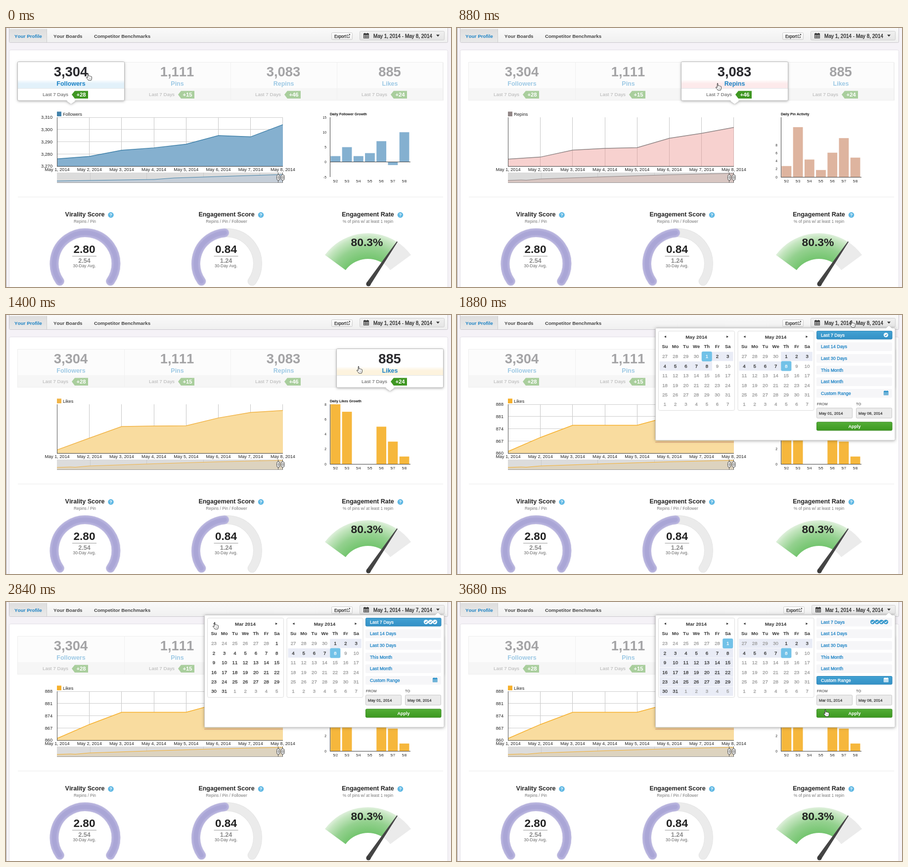
An HTML page with a canvas that plays this animation: 900x525 px, repeating every 3720 ms.

```html
<!DOCTYPE html>
<html lang="en">
<head>
<meta charset="utf-8">
<title>Profile dashboard</title>
<style>
html, body { margin: 0; width: 100%; height: 100%; overflow: hidden; background: #fff; }
canvas { display: block; width: 900px; height: 525px; }
</style>
</head>
<body>
<canvas id="stage" width="900" height="525"></canvas>
<script>
const g = document.getElementById('stage').getContext('2d');
const LOOP = 3720, OPEN = 1840, BLUE = '#1b82c5', GREEN = '#3f9723';
g.fontKerning = 'none';

const series = [
  { name: 'Followers', total: '3,304', gain: 28, first: 3276, daily: [2, 5, 2, 3, 7, -1, 10],
    axis: [3270, 3310, 10], barAxis: [-5, 15, 5], title: 'Daily Follower Growth', start: -999,
    line: [66, 130, 170], fill: '#85b0cf', bar: '#84b0d0', tint: '#e2f1fa', mini: '#c5ced8' },
  { name: 'Pins', total: '1,111', gain: 15, first: 1096, daily: [1, 2, 0, 0, 7, 1, 4],
    axis: [1095, 1115, 5], barAxis: [0, 8, 2], title: 'Daily Pin Activity', start: 230,
    line: [51, 51, 56], fill: 'rgba(110,110,110,.46)', bar: '#a8a7a7', tint: '#f1f1f3', mini: '#c9bfc0' },
  { name: 'Repins', total: '3,083', gain: 46, first: 3037, daily: [3, 14, 5, 2, 6, 11, 5],
    axis: [3020, 3100, 20], barAxis: [0, 16, 4], title: 'Daily Pin Activity', start: 720,
    line: [216, 196, 192], fill: 'rgba(235,140,135,.4)', bar: '#deb49f', tint: '#fdeaeb', mini: '#d8c6c2' },
  { name: 'Likes', total: '885', gain: 24, first: 861, daily: [8, 7, 0, 0, 5, 3, 1],
    axis: [860, 888, 7], barAxis: [0, 8, 2], title: 'Daily Likes Growth', start: 1170,
    line: [246, 176, 45], fill: '#f9dc9f', bar: '#f6b73c', tint: '#fdf3de', mini: '#ddd3bf' }
];
for (const s of series) {
  let v = s.first;
  const [lo, hi] = s.axis;
  s.ys = [v, ...s.daily.map(d => v += d)].map(n => 280 - (n - lo) / (hi - lo) * 99);
}

// time, x, y of the pointer
const path = [
  [0, 168, 99], [120, 168, 99], [400, 357, 99], [600, 357, 99], [880, 529, 119], [960, 541, 116],
  [1400, 715, 111], [1520, 722, 105], [1760, 800, 18], [1880, 800, 18], [2080, 772, 134],
  [2320, 672, 115], [2400, 668, 109], [2600, 424, 48], [2840, 424, 48], [3200, 529, 88],
  [3280, 536, 89], [3400, 549, 88], [3440, 549, 88], [3680, 747, 225], [3720, 747, 225]
];
const hand = new Path2D('M-2.6-6q1.4-.4 1.6 1v3.4q1.5-.8 2.2.3 1.4-.5 2 .5 1.6-.3 1.7 1v2.5q0 2-1.2 3.7h-5' +
  'q-1-2-3.5-4.5-.6-1.4 1-1.3l1.3 1v-6q0-1.2.9-1.6z');

const clamp = v => Math.max(0, Math.min(1, v));
const mix = (a, b, k) => a + (b - a) * k;

function text(s, x, y, size, color = '#333', align = 'left', bold = false) {
  g.font = `${bold ? 'bold ' : ''}${size}px "Liberation Sans", Arial, sans-serif`;
  g.fillStyle = color;
  g.textAlign = align;
  g.fillText(s, x, y);
}
function mediumText(s, x, y, size, color, align = 'left') {
  text(s, x, y, size, color, align);
  g.strokeStyle = color;
  g.lineWidth = .3;
  g.strokeText(s, x, y);
}
function rect(x, y, w, h, fill) { g.fillStyle = fill; g.fillRect(x, y, w, h); }
function box(x, y, w, h, r, fill, stroke) {
  g.beginPath();
  g.roundRect(x, y, w, h, r);
  g.fillStyle = fill;
  g.fill();
  if (stroke) { g.strokeStyle = stroke; g.lineWidth = 1; g.stroke(); }
}
function poly(points, fill, stroke, width = 1) {
  g.beginPath();
  points.forEach(([x, y]) => g.lineTo(x, y));
  if (fill) { g.fillStyle = fill; g.fill(); }
  if (stroke) { g.strokeStyle = stroke; g.lineWidth = width; g.stroke(); }
}
function dot(x, y, r, fill) { g.beginPath(); g.arc(x, y, r, 0, 7); g.fillStyle = fill; g.fill(); }
function fade(y0, y1, ...colors) {
  const f = g.createLinearGradient(0, y0, 0, y1);
  colors.forEach((c, i) => f.addColorStop(i / (colors.length - 1), c));
  return f;
}
function shadowed(blur, draw) {
  g.save();
  g.shadowColor = 'rgba(0,0,0,.35)';
  g.shadowBlur = blur;
  g.shadowOffsetY = 1;
  draw();
  g.restore();
}
function calendarIcon(x, y, s, color, paper) {
  rect(x, y + 1, s, s - 1, color);
  rect(x + 2, y, 1.5, 2, color);
  rect(x + s - 3.5, y, 1.5, 2, color);
  for (let i = 0; i < 9; i++)
    rect(x + 1 + i % 3 * (s - 1) / 3, y + 4 + (i / 3 | 0) * (s - 4) / 3, (s - 1) / 3 - 1, (s - 4) / 3 - 1, paper);
}

function dateLabel(t) {
  if (t < 1960) return 'May 1, 2014 - May 8, 2014';
  if (t < 2440) return 'Apr 1, 2014 - Apr 30, 2014';
  if (t < 3160) return 'May 1, 2014 - May 7, 2014';
  if (t < 3400) return 'Feb 28, 2014 - May 7, 2014';
  return `Mar 1, 2014 - May ${t < 3560 ? 8 : 4}, 2014`;
}

function header(t) {
  rect(0, 0, 900, 525, '#f5f2f7');
  rect(0, 0, 1, 525, '#aaa');
  box(6.5, -4, 887, 33.5, 2, fade(0, 29, '#fafafa', '#f0f0f0'), '#cbc8ce');
  rect(7, 2, 76, 27, fade(2, 29, '#dedede', '#e9e9e9'));
  rect(82, 2, 1, 27, '#cfcfcf');
  text('Your Profile', 17, 19.5, 9.85, BLUE, 'left', true);
  text('Your Boards', 96, 19.5, 9.75, '#444', 'left', true);
  text('Competitor Benchmarks', 178, 19.5, 9.85, '#444', 'left', true);

  const label = dateLabel(t);
  g.font = '10px "Liberation Sans", Arial, sans-serif';
  const left = Math.round(862 - g.measureText(label).width - 28);
  box(left + .5, 6.5, 886 - left, 18, 2, fade(6, 25, '#f1f1f1', '#e4e4e4'), '#cfcfcf');
  calendarIcon(left + 8, 10, 11, '#333', '#f4f4f4');
  mediumText(label, 862, 19.5, 10, '#222', 'right');
  poly([[870, 13.5], [877, 13.5], [873.5, 17.5]], '#333');

  const x = left - 57;
  box(x + .5, 9.5, 42, 14, 2, fade(9, 24, '#fff', '#eee'), '#cdcdcd');
  mediumText('Export', x + 6, 19.5, 8.2, '#333');
  poly([[x + 34, 14], [x + 31.5, 14], [x + 31.5, 19.5], [x + 36.5, 19.5], [x + 36.5, 17]], null, '#444');
  poly([[x + 33.5, 17], [x + 37.5, 13]], null, '#444');
  poly([[x + 35, 12], [x + 38, 12], [x + 38, 15]], '#444');
  box(6.5, 44.5, 887, 500, 3, '#fff', '#e2dfe5');
}

function cards(active) {
  rect(24, 69, 860, 78, '#fcfcfc');
  rect(24, 122, 860, 25, '#f6f6f6');
  g.strokeStyle = '#eee';
  g.lineWidth = 1;
  g.strokeRect(23.5, 69.5, 860, 77);
  for (const order of [0, 1]) series.forEach((s, i) => {
    const on = i === active;
    if (on !== !!order) return;
    const x = 24 + i * 215, mid = x + 107.5;
    if (on) {
      shadowed(5, () => {
        box(x - .5, 68.5, 216, 79, 2, '#fff');
        poly([[mid - 10, 147], [mid, 154], [mid + 10, 147]], '#fff');
      });
      box(x - .5, 68.5, 216, 78.5, 2, '#fff', '#bbb');
      poly([[mid - 9, 146], [mid, 153], [mid + 9, 146]], '#fff');
      rect(x, 106, 215, 16, fade(104, 122, '#fff', s.tint, s.tint));
      rect(x, 122, 215, 1, '#e2e5e8');
    } else rect(x + 215, 70, 1, 77, '#f0f0f0');
    g.globalAlpha = on ? 1 : .42;
    text(s.total, mid - .5, 98, 27.4, '#2b2b2f', 'center', true);
    text(s.name, mid, 116.5, 12.5, BLUE, 'center', true);
    text('Last 7 Days', x + 50, 138, 9.85, '#555');
    poly([[x + 109, 135], [x + 115, 127.5], [x + 142, 127.5], [x + 142, 143], [x + 115, 143]], GREEN);
    g.globalAlpha = 1;
    text('+' + s.gain, x + 128, 139, 11.3, '#fff', 'center', true);
  });
}

function areaChart(s, prev, t) {
  const k = clamp((t - s.start) / 280), settled = t >= s.start + 320;
  const [lo, hi, step] = s.axis, column = i => 103.5 + i * 65.2;
  const color = `rgb(${s.line.map((c, i) => Math.round(mix(prev.line[i], c, k)))})`;
  for (let i = 0; i < 8; i++) rect(Math.round(column(i) - .5), 181, 1, 99, '#c6c6c6');
  if (settled) for (let v = lo; v <= hi; v += step) {
    const y = 280 - (v - lo) / (hi - lo) * 99;
    rect(103, Math.floor(y), 457, 1, '#cecece');
    text(v.toLocaleString('en-US'), 94, y + 3.3, 9.2, '#222', 'right');
  }
  const line = s.ys.map((y, i) => [column(i), mix(prev.ys[i], y, k)]);
  poly([[103.5, 280], ...line, [560, 280]], s.fill);
  poly(line, null, color, 1.5);
  rect(103, 181, 1, 99, '#555');
  rect(103, 280, 457, 1, '#444');
  for (let i = 0; i < 8; i++) text(`May ${i + 1}, 2014`, column(i), 290, 9.1, '#222', 'center');
  rect(103, 169.5, 9, 9.5, color);
  text(s.name, 115, 178, 9.1, '#222');

  // range selector
  rect(103, 293, 457, 20, '#dcdcdc');
  for (let x = 170; x < 540; x += 114.3) rect(Math.round(x), 293, 1, 20, '#cacaca');
  const trend = s === series[0]
    ? [[103, 310], [200, 308.5], [300, 307], [340, 304], [430, 301], [560, 297]]
    : [[103, 309], [130, 308], [140, 308.5], [168, 306], [300, 301.5], [430, 297.5], [560, 294.5]];
  poly([[103, 313], ...trend, [560, 313]], s.mini);
  poly(trend, null, color);
  rect(103, 313, 457, 1, '#999');
  for (const x of [550.5, 559.5]) {
    rect(x - .5, 293, 1, 20, '#555');
    box(x - 3, 297.5, 6.5, 11, 3, '#fff', '#444');
    rect(x - 1, 300, 1, 6, '#666');
    rect(x + 1, 300, 1, 6, '#666');
  }
}

function barChart(s, prev, t) {
  const k = clamp((t - s.start) / 182);
  const lo = mix(prev.barAxis[0], s.barAxis[0], k), hi = mix(prev.barAxis[1], s.barAxis[1], k);
  const toY = v => 302 - (v - lo) / (hi - lo) * 121;
  const [from, to, step] = (k < 1 ? prev : s).barAxis;
  text(s.title, 655, 177, 7.1, '#111', 'left', true);
  for (let v = from; v <= to; v += step)
    if (v >= lo && v <= hi) text(v, 648, toY(v) + 2.5, 6.8, '#222', 'right');
  s.daily.forEach((d, i) => {
    const x = 656.5 + i * 23.2, y = toY(mix(prev.daily[i], d, k));
    rect(x, Math.min(y, toY(0)), 19.8, Math.abs(toY(0) - y), s.bar);
    text(`5/${i + 2}`, x + 9.8, 312.5, 6.9, '#222', 'center');
  });
  rect(655, 181, 1, 121, '#444');
  rect(655, Math.floor(toY(0)), 163, 1, '#444');
}

function gaugeHead(title, sub, x, markX) {
  text(title, x, 382, 12.5, '#222', 'center', true);
  text(sub, x, 395, 8.35, '#777', 'center');
  dot(markX, 379, 5.8, '#5fb8e4');
  text('?', markX, 382.2, 9, '#fff', 'center', true);
}
function ring(x, end, value, average) {
  const arc = (to, width, color) => {
    g.beginPath();
    g.arc(x, 477.5, 62.5, 145 * Math.PI / 180, to * Math.PI / 180);
    g.lineWidth = width;
    g.strokeStyle = color;
    g.stroke();
  };
  g.lineCap = 'round';
  arc(395, 18, '#e2e2e2');
  arc(395, 16.5, '#ebebeb');
  arc(end, 18, '#c1bde2');
  arc(end, 15, '#b4b0dc');
  arc(end, 9, '#aaa6d6');
  g.lineCap = 'butt';
  text(value, x - 1.5, 456, 22.6, '#222', 'center', true);
  rect(x - 26, 462, 49, 1, '#999');
  text(average, x - 1.5, 475.5, 12.7, '#8a8a8a', 'center', true);
  text('30-Day Avg.', x - 1.5, 485, 8.35, '#666', 'center');
}
function fan() {
  const start = 216.3 * Math.PI / 180, sweep = 107.4 * Math.PI / 180, value = start + .803 * sweep;
  const slice = (a, b, fill) => {
    g.beginPath();
    g.arc(732, 524, 108, a, b);
    g.arc(732, 524, 56, b, a, true);
    g.fillStyle = fill;
    g.fill();
  };
  const green = g.createRadialGradient(732, 524, 56, 732, 524, 108);
  [[0, '#74c56f'], [.45, '#94d18f'], [.85, '#c6e6c1'], [1, '#dff0dc']].forEach(c => green.addColorStop(...c));
  slice(start, value, green);
  slice(value, start + sweep, '#ebebeb');
  poly([[790.5, 432.5], [792, 433.5], [736.5, 521.5], [729, 516.5]], '#454545');
  dot(733, 519, 4.6, '#3c3c3c');
  text('80.3%', 730, 441.5, 22.9, '#222', 'center', true);
}
function gauges() {
  rect(24, 342, 860, 1, '#ebebeb');
  gaugeHead('Virality Score', 'Repins / Pin', 159.5, 212);
  gaugeHead('Engagement Score', 'Repins / Pin / Follower', 446, 515.5);
  gaugeHead('Engagement Rate', '% of pins w/ at least 1 repin', 732, 797.5);
  ring(160, 395, '2.80', '2.54');
  ring(446.5, 266, '0.84', '1.24');
  fan();
}

const day = (month, date) => Date.UTC(2014, month, date);
function month(x, m, from, picked, hovered) {
  const today = day(4, 8), offset = new Date(day(m, 1)).getUTCDay();
  box(x + .5, 32.5, 154, 161, 3, '#fff', '#ddd');
  text(['Mar', 'Apr', 'May'][m - 2] + ' 2014', x + 77, 48, 9.8, '#333', 'center', true);
  poly([[x + 16, 41.8], [x + 16, 46.2], [x + 12, 44]], '#333');
  poly([[x + 138, 41.8], [x + 138, 46.2], [x + 142, 44]], '#333');
  ['Su', 'Mo', 'Tu', 'We', 'Th', 'Fr', 'Sa'].forEach((d, i) =>
    text(d, x + 13.5 + i * 21.2, 67, 9.5, '#333', 'center', true));
  for (let i = 0; i < 42; i++) {
    const time = day(m, 1 - offset + i), date = new Date(time);
    const cx = x + 13.5 + i % 7 * 21.2, cy = 84 + (i / 7 | 0) * 19.4;
    if (time >= from && time <= (m < 4 ? day(4, 31) : today)) rect(cx - 10.6, cy - 9.3, 21.3, 18.6, '#e9ecf6');
    if (time === picked) box(cx - 10.5, cy - 10, 21, 20, 3, '#72c2e8');
    if (time === hovered) box(cx - 10.5, cy - 10, 21, 20, 3, '#dcdcdc');
    const usable = date.getUTCMonth() === m && time <= today;
    mediumText(date.getUTCDate(), cx, cy + 3.4, 9.6,
      time === picked ? '#fff' : usable ? '#333' : '#999', 'center');
  }
}

function picker(t) {
  const custom = t >= 3400, shown = t < 2640 ? 4 : t < 2760 ? 3 : 2;
  const from = custom ? day(2, 1) : day(4, 1);
  shadowed(6, () => box(401, 26, 485, 228, 2, '#fff'));
  box(401.5, 26.5, 484.5, 227.5, 2, '#fff', '#c8c8c8');
  poly([[867, 27], [873.5, 21], [880, 27]], '#fff', '#c8c8c8');
  month(407, shown, from, from, t >= 3160 && !custom ? day(1, 28) : 0);
  month(567.5, 4, from, day(4, 8));

  const presets = ['Last 7 Days', 'Last 14 Days', 'Last 30 Days', 'This Month', 'Last Month', 'Custom Range'];
  presets.forEach((name, i) => {
    const y = 32 + i * 23.6, on = i === (custom ? 5 : 0);
    if (on) box(727.5, y + .5, 152.5, 16.5, 2, fade(y, y + 17, '#43a2d3', '#3491c6'), '#2f86b8');
    else box(727, y, 153, 17.5, 2, '#f6f6f8');
    mediumText(name, 736, y + 11.7, 9.1, on ? '#fff' : BLUE);
  });
  const checks = t < 2640 ? 1 : t < 2760 ? 2 : t < 2880 ? 3 : 4;
  for (let i = 0; i < checks; i++) {
    const x = 867.5 - i * 9;
    dot(x, 40.5, 4.6, custom ? '#3597cc' : '#fff');
    poly([[x - 2.2, 40.5], [x - .6, 42.2], [x + 2.3, 38.8]], null, custom ? '#fff' : '#3597cc', 1.3);
  }
  calendarIcon(863, 153, 9.5, ...(custom ? ['#fff', '#3597cc'] : ['#3597cc', '#f4f4f4']));

  text('FROM', 728, 183, 7.3, '#333');
  text('TO', 807, 183, 7.3, '#333');
  const start = t < 3160 ? 'May 01, 2014' : custom ? 'Mar 01, 2014' : 'Feb 28, 2014';
  [[727, start], [807, 'May 08, 2014']].forEach(([x, label]) => {
    box(x + .5, 188.5, 72, 20.5, 2, '#ebebeb', '#c9c9c9');
    mediumText(label, x + 5, 202, 8, '#444');
  });
  box(727.5, 217, 152.5, 17, 2, fade(216, 235, '#55af38', '#3b971f'), '#3a8a22');
  text('Apply', 804, 228.5, 9, '#fff', 'center', true);
}

function pointer(t) {
  const i = path.findIndex(p => p[0] > t), [t0, x0, y0] = path[i - 1], [t1, x1, y1] = path[i];
  const u = (t - t0) / (t1 - t0), k = u * u * (3 - 2 * u);
  g.save();
  g.translate(mix(x0, x1, k), mix(y0, y1, k));
  g.scale(1.1, 1.1);
  g.fillStyle = '#fff';
  g.fill(hand);
  g.strokeStyle = '#222';
  g.lineWidth = .8;
  g.stroke(hand);
  for (const x of [0, 2]) rect(x, 1.5, .6, 2.5, '#777');
  g.restore();
}

function frame(now) {
  const t = Math.floor(now % LOOP / 40) * 40;
  const current = series.findLastIndex(s => t >= s.start);
  const s = series[current], prev = series[Math.max(0, current - 1)];
  header(t);
  cards(series.findLastIndex(c => t >= c.start - 40));
  areaChart(s, prev, t);
  barChart(s, prev, t);
  gauges();
  if (t >= OPEN) {
    rect(401, 257, 159, 1.5, 'rgba(215,140,110,.6)');
    picker(t);
  }
  pointer(t);
  requestAnimationFrame(frame);
}
requestAnimationFrame(frame);
</script>
</body>
</html>
```
